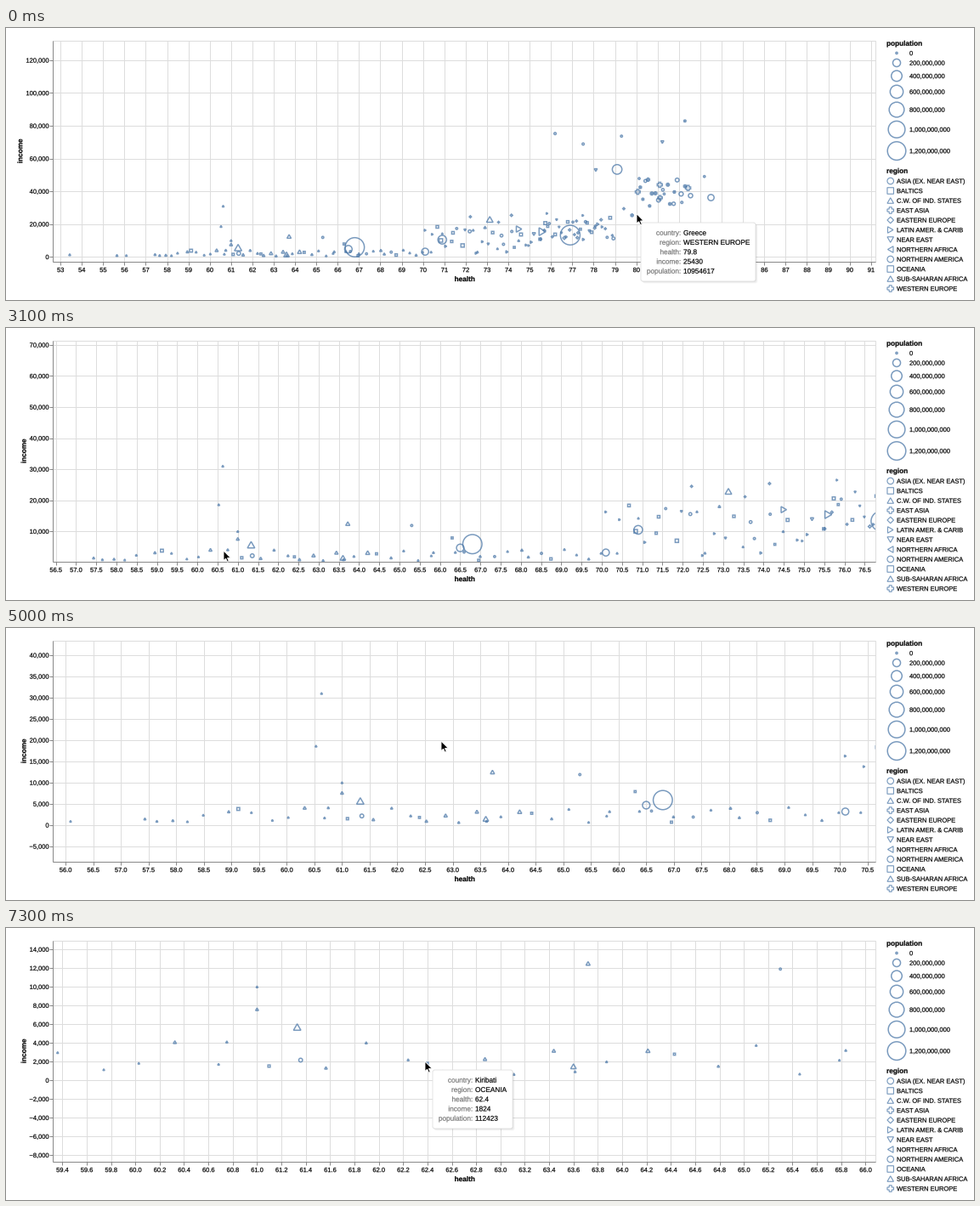
These frames come from a looping animation (1139x320 px, 7400 ms). A matplotlib script:

```python
import numpy as np
import matplotlib.pyplot as plt
from matplotlib.animation import FuncAnimation
from matplotlib.collections import LineCollection, PathCollection
from matplotlib.patches import FancyBboxPatch, PathPatch, Polygon, Rectangle
from matplotlib.path import Path
from matplotlib.textpath import TextPath
from matplotlib.transforms import IdentityTransform

W, H, DPI = 1139, 320, 64
PT = 72 / DPI                      # points per pixel
STEP, FRAMES = 100, 74
LEFT, TOP, RIGHT, BOTTOM = 55, 14.5, 1023, 275
CORNER = np.array([LEFT, TOP])
EXTENT = np.array([RIGHT - LEFT, BOTTOM - TOP])
BLUE = (0.298, 0.471, 0.659, 0.75)

fig = plt.figure(figsize=(W / DPI, H / DPI), dpi=DPI, facecolor="white")
ax = fig.add_axes([0, 0, 1, 1])
ax.set(xlim=(0, W), ylim=(H, 0))
ax.axis("off")


# --- text as outlines, so that letters keep fractional positions -------------
letter_cache = {}


def text_path(x, y, text, size=7.5, align=0, bold=False, upward=False):
    """Baseline at y; align is 0 for left, 0.5 for centre, 1 for right."""
    key = text, size, align, bold, upward
    if key not in letter_cache:
        font = {"family": "Liberation Sans", "weight": "bold" if bold else "normal"}
        outline = TextPath((0, 0), text, size=size, prop=font)
        points = outline.vertices * (1, -1)
        points[:, 0] -= align * points[:, 0].max()
        if upward:
            points = np.column_stack([points[:, 1], -points[:, 0]])
        letter_cache[key] = points, outline.codes
    points, codes = letter_cache[key]
    return Path(points + (x, y), codes)


def ink(*paths, color="black", zorder=4):
    return ax.add_patch(PathPatch(Path.make_compound_path(*paths), fc=color,
                                  ec=color, lw=0.2 * PT, zorder=zorder))


# --- marks -----------------------------------------------------------------
A = 3 ** 0.5 / 2
TRIANGLE = np.array([(0, A), (-1, -A), (1, -A)])
SQUARE = np.array([(-1, -1), (1, -1), (1, 1), (-1, 1)])
ARM = np.array([(1, -.4), (1, .4), (.4, .4)])


def turn(points, quarters):
    for _ in range(quarters):
        points = np.column_stack([-points[:, 1], points[:, 0]])
    return points


OUTLINES = {
    "square": SQUARE,
    "diamond": np.array([(-1, 0), (0, -1), (1, 0), (0, 1)]),
    "cross": np.vstack([turn(ARM, q) for q in range(4)]),
    "up": TRIANGLE, "left": turn(TRIANGLE, 1),
    "down": turn(TRIANGLE, 2), "right": turn(TRIANGLE, 3),
}


def outline(shape, radius):
    if shape == "circle":
        circle = Path.unit_circle()
        return Path(circle.vertices * radius, circle.codes)
    corners = OUTLINES[shape]
    return Path(np.vstack([corners, corners[:1]]) * radius, closed=True)


def radius_of(millions):
    return (1.2 + 0.096 * millions) ** 0.5


def marks(paths, offsets, width=1.5):
    group = PathCollection(paths, offsets=offsets, offset_transform=ax.transData,
                           transform=IdentityTransform(), facecolors="none",
                           edgecolors=[BLUE], linewidths=width * PT,
                           joinstyle="miter", snap=False, zorder=3)
    ax.add_collection(group, autolim=False)
    return group


# --- data: health, income in thousands, population in millions ---------------
LANDMARKS = {
    "circle": [(66.8, 5.9, 1311), (76.9, 13.3, 1376), (79.1, 53.4, 321),
               (70.9, 10.5, 257), (66.5, 4.7, 189), (70.1, 3.2, 161),
               (83.5, 36.2, 127), (65.3, 11.9, 3)],
    "up": [(61.33, 5.7, 182), (73.13, 22.9, 143), (63.6, 1.5, 99),
           (63.72, 12.5, 50), (60.63, 31, 2), (60.53, 18.6, 2),
           (61, 10, 2), (61, 7.6, 20)],
    "right": [(75.6, 15.4, 208), (74.5, 17, 127)],
    "square": [(66.3, 7.9, 1), (62.4, 1.82, 1)],
    "down": [(78.1, 53, 20), (82, 132.9, 2)],
    "cross": [(79.8, 25.4, 11), (81.1, 44, 81)],
}
# count, health range, income range, mean population, shapes
CLOUDS = [
    (3, (53, 57), (.5, 1.6), 4, "up"),
    (44, (57.3, 69.8), (.6, 4.2), 9, "up up up up up square circle"),
    (34, (69.9, 75.5), (2, 19), 9, "right right up up down square circle"),
    (34, (75.5, 79), (10, 24), 6, "right diamond diamond down square circle"),
    (7, (71, 80), (21, 30), 4, "right square diamond"),
    (22, (80, 82.6), (30, 48), 20, "cross cross circle"),
    (7, (76, 84), (45, 90), 4, "down circle cross"),
]
rng = np.random.default_rng(8)
paths, values = [], []


def add(shape, health, income, population):
    paths.append(outline(shape, radius_of(population)))
    values.append((health, income * 1000))


for shape, countries in LANDMARKS.items():
    for country in countries:
        add(shape, *country)
for count, health, income, population, shapes in CLOUDS:
    for share in (np.arange(count) + rng.random(count)) / count:
        add(str(rng.choice(shapes.split())), np.interp(share, (0, 1), health),
            rng.uniform(*income), rng.exponential(population))
values = np.array(values)

# --- plot ------------------------------------------------------------------
plot_area = Rectangle(CORNER, *EXTENT, fc="none", ec="#dddddd", lw=PT, zorder=1)
ax.add_patch(plot_area)
points = marks(paths, values)
points.set_clip_path(plot_area)


def lines(color, zorder):
    group = LineCollection([], colors=color, linewidths=PT, zorder=zorder)
    ax.add_collection(group, autolim=False)
    return group


grid, ticks = lines("#dddddd", 1), lines("#888888", 2)
axis_text = ink(text_path(539.5, 298, "health", 8.25, 0.5, bold=True))

# --- legends ---------------------------------------------------------------
REGIONS = {
    "ASIA (EX. NEAR EAST)": "circle", "BALTICS": "square",
    "C.W. OF IND. STATES": "up", "EAST ASIA": "cross",
    "EASTERN EUROPE": "diamond", "LATIN AMER. & CARIB": "right",
    "NEAR EAST": "down", "NORTHERN AFRICA": "left",
    "NORTHERN AMERICA": "circle", "OCEANIA": "square",
    "SUB-SAHARAN AFRICA": "up", "WESTERN EUROPE": "cross",
}
legend = [text_path(1036, 20.8, "population", 8.25, bold=True),
          text_path(1036, 170.8, "region", 8.25, bold=True)]
y, previous = 29.5, None
for millions in range(0, 1400, 200):
    radius = radius_of(millions)
    if previous:
        y += max(11.5, previous + radius + 4.6)
    marks([outline("circle", radius)], [(1048, y)])
    legend.append(text_path(1063, y + 2.7, f"{millions * 10 ** 6:,}"))
    previous = radius
for i, (name, shape) in enumerate(REGIONS.items()):
    y = 180 + 11.5 * i
    marks([outline(shape, 3.75)], [(1040.7, y)], 1.15)
    legend.append(text_path(1048, y + 2.7, name))
ink(*legend)

# --- tooltips and pointer --------------------------------------------------
FIELDS = ["country", "region", "health", "income", "population"]


def tooltip(start, end, x, y, *entries):
    rows = [y + 14.7 + 11.25 * i for i in range(len(FIELDS))]
    keys = [text_path(x + 46.5, row, field + ":", 8.25, 1)
            for row, field in zip(rows, FIELDS)]
    texts = [text_path(x + 50, row, entry, 8.25) for row, entry in zip(rows, entries)]
    width = max(text.vertices[:, 0].max() for text in texts) - x + 7

    def box(shift, **style):
        return ax.add_patch(FancyBboxPatch(
            (x + shift, y + shift), width, 69, zorder=5,
            boxstyle="round,pad=0,rounding_size=2.5", **style))

    parts = [box(shift, fc=(0, 0, 0, 0.035), ec="none") for shift in (0.8, 1.6, 2.4)]
    parts += [box(0, fc="white", ec="#dcdcdc", lw=0.8 * PT),
              ink(*keys, color="#777777", zorder=6), ink(*texts, zorder=6)]
    return start, end, parts


tooltips = [
    tooltip(0, 100, 747, 229, "Greece", "WESTERN EUROPE", "79.8", "25430", "10954617"),
    tooltip(1100, 1400, 724, 177, "United States", "NORTHERN AMERICA", "79.1",
            "53354", "321773631"),
    tooltip(7300, 7400, 502, 167, "Kiribati", "OCEANIA", "62.4", "1824", "112423"),
]

ARROW = np.array([(0, 0), (0, 11.6), (2.6, 9.2), (4.5, 13.2), (6.3, 12.4),
                  (4.5, 8.5), (8.2, 8.3)])
pointer = ax.add_patch(Polygon(ARROW, fc="black", ec="white", lw=0.9 * PT, zorder=7))

# --- motion ----------------------------------------------------------------
# time and place of the pointer tip where it starts, stops or turns
POINTER = np.array([
    (0, 742, 218.5), (600, 768, 112), (1100, 718, 167), (1300, 718, 167),
    (1900, 251, 270.5), (2100, 256, 262), (3200, 256, 262), (3680, 386, 188.5),
    (4200, 540, 118), (4400, 512, 133), (5700, 512, 133), (5900, 484, 212),
    (6450, 524, 40.5), (6900, 493, 157)])

# start, end and span factor of a zoom around the pointer; no factor is a drag
GESTURES = [
    (2100, 2500, 1.037), (2700, 3100, 0.5085), (3680, 4200, None),
    (4400, 4500, 0.9907), (4500, 4700, 0.844), (4900, 5100, 0.765),
    (5300, 5800, 0.5196), (5900, 6450, None)]


def pointer_at(ms):
    return np.array([np.interp(ms, POINTER[:, 0], POINTER[:, i]) for i in (1, 2)])


def view_at(ms):
    """The data value at the upper left corner and the data span per axis."""
    corner, span = np.array([52.64, 132150]), np.array([38.57, -135100])
    for start, end, factor in GESTURES:
        if ms <= start:
            break
        now = min(ms, end)
        if factor:
            focus = (pointer_at(start) - CORNER) / EXTENT
            zoomed = span * factor ** ((now - start) / (end - start))
            corner, span = corner + focus * (span - zoomed), zoomed
        else:
            corner = corner - (pointer_at(now) - pointer_at(start)) / EXTENT * span
    return corner, span


def nice_ticks(low, high, count):
    rough = (high - low) / count
    power = 10.0 ** np.floor(np.log10(rough))
    # round to the nearest of 1, 2, 5 and 10 on a log scale
    step = power * [1, 2, 5, 10][sum(rough / power >= np.sqrt([2, 10, 50]))]
    return np.arange(np.ceil(low / step), np.floor(high / step) + 1) * step, step


def draw(frame):
    ms = frame * STEP
    corner, span = view_at(ms)
    (low, top), (high, bottom) = corner, corner + span

    def to_pixels(data):
        return CORNER + (data - corner) / span * EXTENT

    points.set_offsets(to_pixels(values))
    healths, step = nice_ticks(low, high, 33)
    incomes, _ = nice_ticks(bottom, top, 9)
    xs = np.interp(healths, (low, high), (LEFT, RIGHT))
    ys = np.interp(incomes, (bottom, top), (BOTTOM, TOP))
    grid.set_segments([[(x, TOP), (x, BOTTOM)] for x in xs]
                      + [[(LEFT, y), (RIGHT, y)] for y in ys])
    ticks.set_segments([[(x, BOTTOM), (x, BOTTOM + 4)] for x in xs]
                       + [[(LEFT - 4, y), (LEFT, y)] for y in ys]
                       + [[(LEFT, TOP), (LEFT, BOTTOM)], [(LEFT, BOTTOM), (RIGHT, BOTTOM)]])

    decimals = 0 if step >= 1 else 1
    names = [f"{round(income):,}".replace("-", "\u2212") for income in incomes]
    title_x = 19.3 if max(map(len, names)) > 6 else 23.6
    axis_text.set_path(Path.make_compound_path(
        text_path(539.5, 298, "health", 8.25, 0.5, bold=True),
        text_path(title_x, 145, "income", 8.25, 0.5, bold=True, upward=True),
        *[text_path(x, 287.1, f"{health:.{decimals}f}", align=0.5)
          for x, health in zip(xs, healths)],
        *[text_path(50.3, y + 2.7, name, align=1) for y, name in zip(ys, names)]))

    for start, end, parts in tooltips:
        for part in parts:
            part.set_visible(start <= ms < end)
    pointer.set_xy(ARROW + pointer_at(ms))
    return []


animation = FuncAnimation(fig, draw, frames=FRAMES, interval=STEP,
                          init_func=lambda: draw(0), repeat=True, repeat_delay=0)
plt.show()
```
